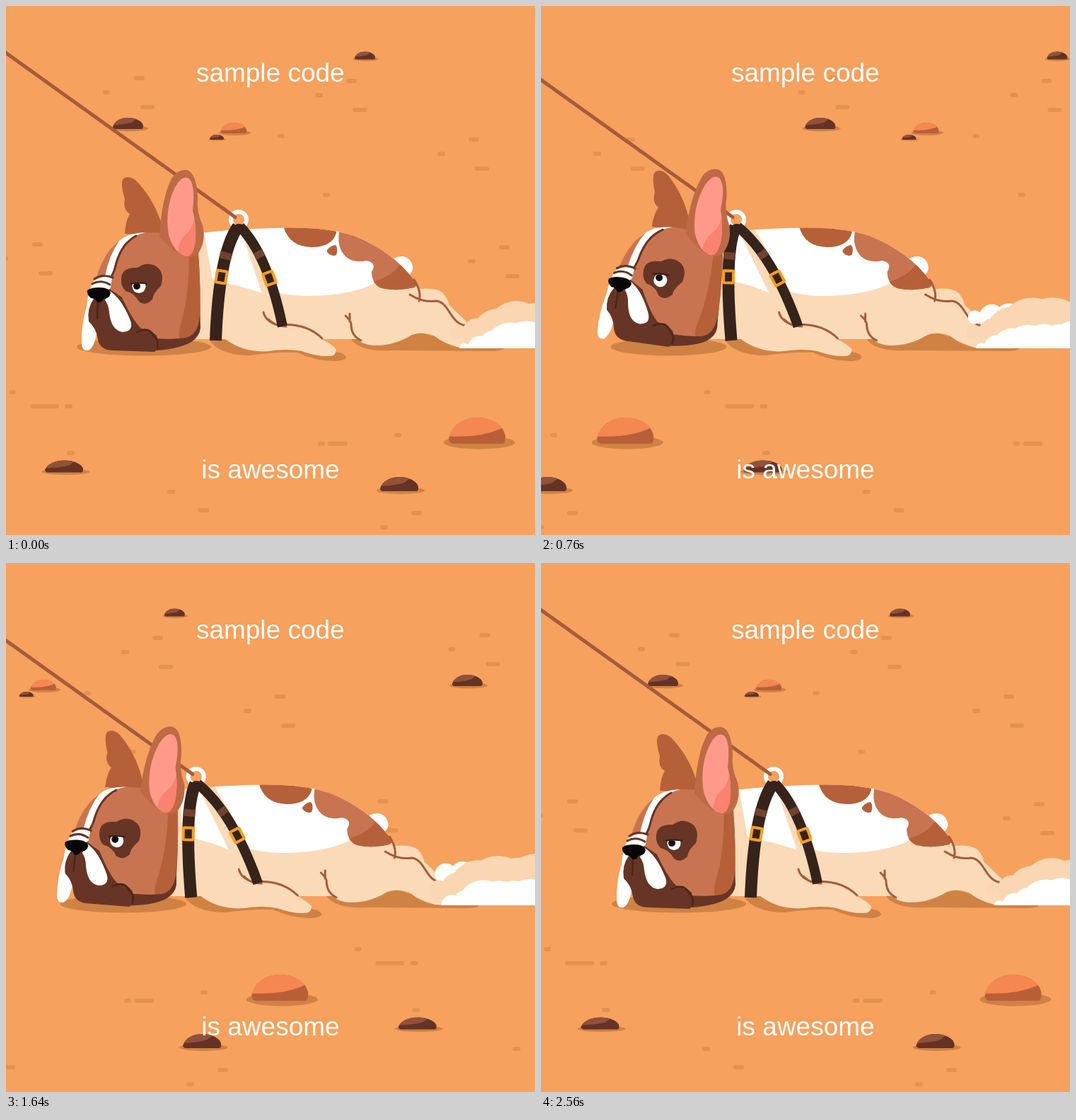
Recreate the animation shown at these times as an HTML page with a canvas. Size 748x748 px, loop 2.6 s.

```html
<!DOCTYPE html>
<html lang="en">
<head>
<meta charset="utf-8">
<title>Lazy walk</title>
<style>
html, body { margin: 0; width: 100%; height: 100%; overflow: hidden; background: #f6a15d; }
canvas, svg { position: absolute; left: 0; top: 0; width: 748px; height: 748px; }
text { font: 37px "Liberation Sans", Arial, sans-serif; fill: #fff; text-anchor: middle; }
</style>
</head>
<body>
<canvas id="stage" width="748" height="748"></canvas>
<svg viewBox="0 0 748 748">
  <text x="373.8" y="107">sample code</text>
  <text x="374" y="668">is awesome</text>
</svg>
<script>
const ctx = document.getElementById('stage').getContext('2d');
const LOOP = 2600, MOVE = 2560, STEP = 40;
const C = {
  sand: '#f6a15d', dash: '#e4924f', shade: '#cf8244', cream: '#fbdab8', dust: '#fad7b2',
  fur: '#c97450', dark: '#b6603a', mask: '#673525', line: '#a65b3b', strap: '#36231a',
  band: '#70422f', gold: '#f79e1e', pink: '#ff9a8a', rose: '#f98270'
};

// x, y, width
const dashes = [
  [181, 102, 15], [137, 122, 10], [190, 143, 20], [384, 184, 10], [481, 106, 15], [437, 126, 11],
  [490, 147, 20], [654, 189, 15], [610, 209, 11], [663, 230, 20], [448, 267, 10], [37, 337, 15],
  [46, 378, 20], [-8, 357, 11], [653, 361, 11], [697, 341, 15], [706, 382, 20], [4, 546, 10],
  [34, 566, 41], [83, 566, 11], [86, 632, 11], [228, 687, 11], [272, 713, 15], [441, 619, 10],
  [455, 619, 28], [549, 607, 10], [573, 717, 15], [529, 737, 11]
];
// x, base y, width, height, orange
const farRocks = [[493, 75.5, 29, 11], [151, 174, 43, 16], [304, 180, 36, 15, 1], [288, 189, 20, 7]];
const nearRocks = [[55, 659.5, 54, 17], [529, 686, 54, 20], [626, 619, 80, 37, 1]];

const shape = d => new Path2D(d);
const body = {
  legShade: shape('M286 470Q300 494 345 494Q385 489 412 490Q440 503 467 502Q481 501 481 496Q476 488 460 489L420 470Z'),
  hindShade: shape('M488 471Q500 489 545 487L690 488Q704 487 705 483L640 478L585 461Z'),
  tail: shape('M548 357Q562 350 571 359Q580 372 570 380Z'),
  skin: shape('M254 321L285 320Q340 314 400 313.500Q456 313 492 325Q547 347 577 388L584 400Q607 398 617 405Q626 415 626 422L660 455L655 484L641 483Q620 478 605 466Q588 460 574 465Q548 481 520 480Q504 479 497 471L446 471Q459 477 467 485Q467 495 457 495Q440 496 418 488Q396 484 372 488Q337 491 310 471L254 471Z'),
  back: shape('M385 314Q456 311 492 325Q547 347 577 388L575 388L523 391Q490 409 430 410Q400 410 380 404L330 316Z'),
  patchA: shape('M392 310Q399 340 432 341Q461 341 467 321L467 305Z'),
  patchB: shape('M454 345Q460 338 466 338Q470 343 467 352Q460 355 454 348Z'),
  patchC: shape('M472 315Q466 341 481 355Q493 364 510 360Q525 363 517 376Q517 393 531 399Q554 404 577 398L590 386L540 320Z'),
  patchLow: shape('M559 362Q552 379 520 390Q525 397 531 399Q554 404 577 398L590 386Z'),
  creases: shape('M577 387Q588 404 584 417M571 408Q590 420 608 417C629 419 627 453 655 452M364 433Q367 446 384 451Q424 447 447 470M371 443Q382 454 396 453M480 438Q489 446 488 452Q489 467 502 473M486 435L486 446')
};
const head = {
  backEar: shape('M168 322Q169 304 175 294Q165 288 168 273Q161 250 166 244Q173 239 183 246Q207 270 219 305L221 325Z'),
  face: shape('M128 384Q138 350 157 335Q170 322 196 320L266 322L272 350Q276 400 274 456Q272 474 246 476L160 480L124 420Z'),
  side: shape('M258 320L266 322L272 350Q276 400 274 456Q272 470 250 472Q241 472 247 450Q262 400 258 320Z'),
  jaw: shape('M274 432Q274 464 255 469Q235 472 205 470L200 488Q244 486 262 475Q274 467 275 455Z'),
  stripe: shape('M197 320Q172 321 160 332Q146 352 140 382L150 384Q155 352 168 336Q178 325 197 320Z'),
  stripeLine: shape('M184 325Q164 336 156 363Q153 377 148 384'),
  flapL: shape('M124 389Q116 402 114 425Q106 452 107 478Q108 489 117 487Q125 482 128 463L132 420L148 398L150 384Q136 380 124 389Z'),
  muzzle: shape('M124 414Q114 428 117 446Q128 456 130 472Q133 486 150 487L210 489Q218 482 213 466Q204 457 191 456Q180 446 164 412L146 400Z'),
  flapR: shape('M145 402Q163 412 176 445Q181 460 165 461Q149 459 146 434Q145 422 140 416Z'),
  wrinkles: shape('M125 386Q136 378 151 384M122 393Q134 386 147 394'),
  mouth: shape('M130 418L129 442M185 461Q203 452 209 467Q217 472 214 484'),
  nose: shape('M115 402Q120 398 132 398Q146 398 148 406Q146 414 138 414Q136 420 129 419Q126 413 120 413Q114 408 115 402Z'),
  patch: shape('M163 386Q163 369 186 370Q202 359 216 371Q224 380 219 396Q208 406 207 415Q197 425 188 418Q182 406 169 403Q162 396 163 386Z'),
  ear: shape('M217 326Q220 272 234 244Q243 230 256 232Q269 236 271 270Q269 291 278 310Q283 331 273 348Q266 358 252 354Q234 346 217 326Z'),
  earIn: shape('M230 324Q224 287 239 256Q249 238 259 244Q268 254 264 289Q269 307 268 331Q265 354 255 354Q238 350 230 324Z'),
  earLow: shape('M266 300Q269 315 268 331Q265 354 255 354Q248 352 243 347Q245 330 255 322Q263 316 266 300Z')
};

function fill(path, color) { ctx.fillStyle = color; ctx.fill(path); }
function stroke(path, color, width) {
  ctx.strokeStyle = color; ctx.lineWidth = width; ctx.stroke(path);
}
function disc(x, y, rx, color, ry = rx) {
  ctx.beginPath(); ctx.ellipse(x, y, rx, ry, 0, 0, 7);
  ctx.fillStyle = color; ctx.fill();
}
function shifted(x, y, draw) {
  ctx.save(); ctx.translate(x, y); draw(); ctx.restore();
}
function turned(px, py, deg, draw) {
  ctx.save();
  ctx.translate(px, py); ctx.rotate(deg * Math.PI / 180); ctx.translate(-px, -py);
  draw();
  ctx.restore();
}
function clipped(path, draw) {
  ctx.save(); ctx.clip(path); draw(); ctx.restore();
}
// Cosine-eased keys: [time, value]
function keys(t, ...list) {
  if (t <= list[0][0]) return list[0][1];
  for (let i = 1; i < list.length; i++) {
    const [a, u] = list[i - 1], [b, v] = list[i];
    if (t <= b) return u + (v - u) * (1 - Math.cos(Math.PI * (t - a) / (b - a))) / 2;
  }
  return list[list.length - 1][1];
}
const noise = n => { const s = Math.sin(n * 91.7 + 4.1) * 437.5; return s - Math.floor(s); };

function scroll(t, travel, period, draw) {
  const x = (t / MOVE * travel) % period;
  shifted(x, 0, draw);
  shifted(x - period, 0, draw);
}
function drawDashes() {
  ctx.fillStyle = C.dash;
  for (const [x, y, w] of dashes) {
    ctx.beginPath(); ctx.roundRect(x, y - 3, w, 6, 3); ctx.fill();
  }
}
function drawRock([x, y, w, h, orange]) {
  disc(x + w * .54, y - h * .05, w * .63, C.shade, h * .25);
  ctx.save();
  ctx.translate(x, y); ctx.scale(w, h);
  const dome = shape('M.07 0Q0-.03 0-.2C.06-.72 .28-1 .5-1C.74-1 .97-.72 1-.3Q1.010 0 .94 0Z');
  fill(dome, orange ? '#b95f38' : '#653325');
  ctx.clip(dome);
  fill(shape(orange ? 'M0-1H1V-.66Q.75-.36 .4-.3Q.15-.27 0-.28Z' : 'M0-1H.85Q.72-.82 .65-.62Q.5-.42 0-.35Z'),
    orange ? '#f58751' : '#91513a');
  ctx.restore();
}

// Puffs leave the foot and swell as they drift back
function puffs(t, color, x0, y, gap, size, first, grow, seed) {
  const count = Math.round(MOVE / (gap / .295)), step = t / MOVE * count;
  const base = Math.floor(step), part = step - base;
  for (let i = 0; i * gap < 230; i++) {
    const d = (i + part) * gap, id = ((i - base) % count + count) % count;
    const r = Math.min(size, first + d * grow) * (.88 + .2 * noise(id + seed));
    disc(x0 + d, y, r, color);
  }
}
function drawDust(t) {
  clipped(shape('M0 0H900V484H0Z'), () => {
    const fresh = Math.min(1, Math.min(t, MOVE - t) / 350);
    puffs(t, '#fff', 636, 440, 24, 20 * fresh, 9 * fresh, .35, 3);
    puffs(t, C.dust, 638, 462, 28, 48, 10, .45, 20);
    ctx.fillStyle = C.dust; ctx.fillRect(680, 450, 220, 34);
    puffs(t, '#fff', 648, 484, 22, 37, 7, .46, 50);
  });
}

function drawStrap(a, b, c, width, at) {
  const point = u => [0, 1].map(k => (1 - u) ** 2 * a[k] + 2 * u * (1 - u) * b[k] + u * u * c[k]);
  const slope = u => Math.atan2(
    (1 - u) * (b[1] - a[1]) + u * (c[1] - b[1]), (1 - u) * (b[0] - a[0]) + u * (c[0] - b[0]));
  const place = (u, draw) => {
    ctx.save(); ctx.translate(...point(u)); ctx.rotate(slope(u) - Math.PI / 2); draw(); ctx.restore();
  };
  ctx.lineCap = 'butt';
  stroke(shape(`M${a}Q${b} ${c}`), C.strap, width);
  place(.38, () => { ctx.fillStyle = C.band; ctx.fillRect(-width / 2, -5, width, 10); });
  place(at, () => {
    ctx.strokeStyle = C.gold; ctx.lineWidth = 4;
    ctx.beginPath(); ctx.roundRect(-7, -8.500, 14, 17, 1.500); ctx.stroke();
  });
  ctx.lineCap = 'round';
}

function drawBody(pull) {
  const near = 25.5 * pull, mid = 15 * pull, ring = 329 - near;
  fill(body.tail, '#fff');
  fill(body.skin, C.cream);
  clipped(body.skin, () => {
    fill(body.back, '#fff');
    // Chest fur follows the harness
    fill(shape(`M279 314L${333 - near} 314L${362 - 12 * pull} 406Q330 395 ${292 - 6 * pull} 387Z`), '#fff');
    fill(shape(`M${333 - near} 319L${362 - 12 * pull} 406L381 405L${350 - mid} 340Z`), C.cream);
    fill(body.patchA, C.dark);
    fill(body.patchB, C.dark);
    fill(body.patchC, C.fur);
    fill(body.patchLow, C.dark);
  });
  stroke(body.creases, C.line, 3);
  ctx.strokeStyle = '#fff'; ctx.lineWidth = 6;
  ctx.beginPath(); ctx.arc(ring, 302, 11, 0, 7); ctx.stroke();
  stroke(shape(`M-40 ${302 - .716 * (ring + 40)}L${ring - 5} 298.5`), C.line, 5);
  drawStrap([331 - near, 312], [370 - mid, 352], [391, 453], 14, .62);
  drawStrap([328 - near, 312], [301 - mid, 350], [296.5, 473], 17, .57);
  disc(ring + .5, 313, 7, C.strap, 5);
}

function drawEye(open) {
  const lid = 392.5 - 4 * open;
  clipped(shape(`M170 ${lid}H210V430H170Z`), () => {
    disc(188, 396.5, 9.5, '#fff');
    disc(185 + open, 396 - 3 * open, 5, '#120b09');
  });
  stroke(shape(`M177 ${lid}Q188 ${lid - 2 - open} 199 ${lid}`), '#351c15', 2);
}
function drawHead(tilt, flop) {
  shifted(0, Math.max(0, -flop - 1.5) * .5, () =>
    turned(195, 320, flop * .6, () => fill(head.backEar, C.dark)));
  fill(head.face, C.fur);
  fill(head.side, C.dark);
  fill(head.jaw, C.mask);
  fill(head.stripe, '#fff');
  stroke(head.stripeLine, C.mask, 3);
  fill(head.flapL, '#fff');
  fill(head.muzzle, C.mask);
  fill(head.flapR, '#fff');
  stroke(head.mouth, '#4b251a', 2.5);
  stroke(head.wrinkles, C.mask, 3);
  fill(head.nose, '#080506');
  fill(head.patch, C.mask);
  drawEye(tilt / 6);
  turned(252, 348, flop, () => {
    fill(head.ear, '#bd6a45');
    fill(head.earIn, C.pink);
    fill(head.earLow, C.rose);
  });
}

function draw(t) {
  const sway = -21.25 * (1 - Math.cos(2 * Math.PI * t / MOVE));
  const pull = keys(t, [0, 0], [650, 1], [1715, 1], [2418, 0]);
  const tilt = keys(t, [0, 0], [400, 9.5], [700, 6], [1450, 6], [1800, 0]);
  const flop = keys(t, [400, 0], [700, -1.5], [1500, -1.5], [1640, 2], [1880, -9.5], [2150, 0]);
  const reach = keys(t, [0, 0], [680, 26], [1450, 26], [1800, 0]);

  ctx.fillStyle = C.sand;
  ctx.fillRect(0, 0, 748, 748);
  ctx.lineCap = ctx.lineJoin = 'round';
  scroll(t, 762.4, 762.4, drawDashes);
  scroll(t, 749, 749, () => farRocks.forEach(drawRock));
  scroll(t, 780, 778.5, () => nearRocks.forEach(drawRock));

  shifted(sway, 0, () => {
    disc((100 + reach + 290) / 2, 482, (190 - reach) / 2, C.shade, 12.5);
    fill(body.legShade, C.shade);
    fill(body.hindShade, C.shade);
    drawBody(pull);
    turned(275, 470, tilt, () => drawHead(tilt, flop));
    drawDust(t);
  });
}

const start = performance.now();
function tick() {
  const t = (performance.now() - start) % LOOP;
  draw(Math.min(MOVE, Math.floor(t / STEP) * STEP));
  requestAnimationFrame(tick);
}
tick();
</script>
</body>
</html>
```
